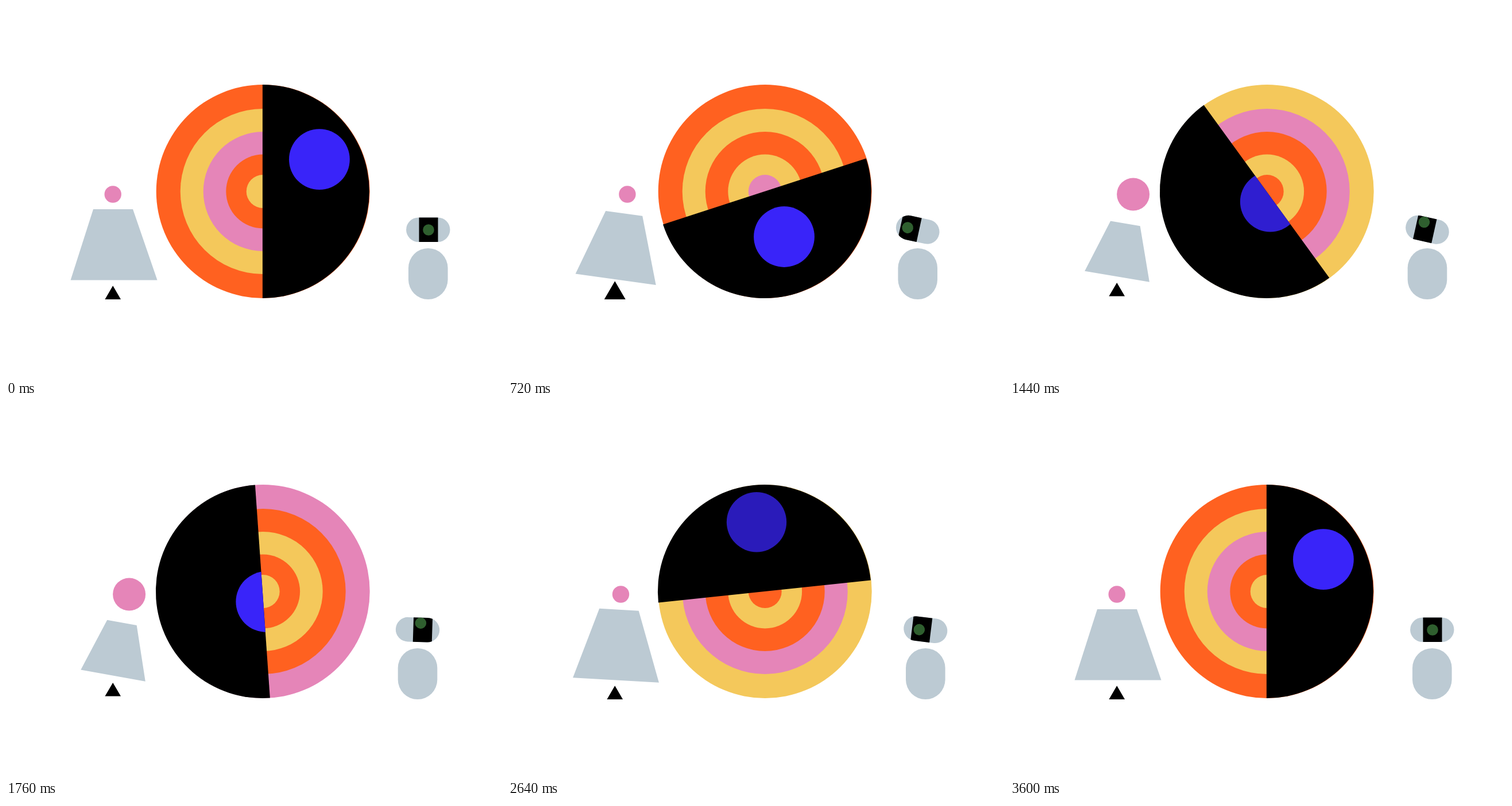
These frames come from a looping animation (864x648 px, 3640 ms). An HTML page with a canvas:

```html
<!DOCTYPE html>
<html>
<head>
<meta charset="utf-8">
<style>
  html, body { margin: 0; width: 100%; height: 100%; overflow: hidden; background: #fff; }
  canvas { display: block; }
</style>
</head>
<body>
<canvas id="stage" width="864" height="648"></canvas>
<script>
const ctx = document.getElementById('stage').getContext('2d');
const TAU = Math.PI * 2;
const LOOP = 3640, TURN = 3600, FRAME = 40;
const ORANGE = '#ff6120', YELLOW = '#f4c85b', PINK = '#e585b8';
const GREY = '#bccad3', BLUE = '#3924f9', GREEN = '#2f5f2f', BLACK = '#000';

const RING_RADII = [186, 144, 104, 64.4, 29];
const RING_COLORS = [ORANGE, YELLOW, PINK, ORANGE, YELLOW];
const MOONS = [[481, 402], [453.3, 341], [433, 202.2], [545.9, 267.2]];

const clamp = u => Math.max(0, Math.min(1, u));

// 0 to 1 with easing at both ends
function rise(t, start, end) {
  const u = clamp((t - start) / (end - start));
  return u * u * (3 - 2 * u);
}
// eases up, holds, eases down
const hold = (t, a, b, c, d) => rise(t, a, b) - rise(t, c, d);
// one soft swing up and back
const swing = (t, start, end) => Math.sin(clamp((t - start) / (end - start)) * Math.PI) ** 2;

function fillPath(color, build) {
  ctx.beginPath();
  build();
  ctx.fillStyle = color;
  ctx.fill();
}
const circle = (x, y, r, color) => fillPath(color, () => ctx.arc(x, y, r, 0, TAU));
const polygon = (color, ...points) => fillPath(color, () => points.forEach(p => ctx.lineTo(...p)));
const pill = (x, y, w, h, color) =>
  fillPath(color, () => ctx.roundRect(x - w / 2, y - h / 2, w, h, Math.min(w, h) / 2));

function group(x, y, degrees, scale, draw) {
  ctx.save();
  ctx.translate(x, y);
  ctx.rotate(degrees * TAU / 360);
  ctx.scale(scale, scale);
  draw();
  ctx.restore();
}

function drawDisc(t) {
  const step = Math.floor(t / 240);
  RING_RADII.forEach((r, i) => circle(447.7, 323, r, RING_COLORS[(i + step) % 5]));

  const angle = t / TURN * TAU;
  ctx.save();
  fillPath(BLACK, () => ctx.arc(446.9, 323, 186, angle - TAU / 4, angle + TAU / 4));
  ctx.clip();
  drawMoons(t);
  ctx.restore();
}

// A moon appears every 800 ms; each is gone shortly before the next, the last stays into the next turn.
function drawMoons(t) {
  const first = 440, gap = 800;
  MOONS.forEach(([x, y], i) => {
    const start = first + gap * i;
    const next = i < MOONS.length - 1 ? start + gap : first + TURN;
    const age = (t - start + TURN) % TURN;
    const alpha = clamp(Math.min(age / 240, (next - start - 80 - age) / 160));
    ctx.globalAlpha = alpha;
    circle(x, y, 50 + 2.9 * alpha, BLUE);
  });
}

function drawBell(t) {
  const shrink = hold(t, 560, 1040, 2240, 2680);
  const sway = swing(t, 1160, 2360);

  const headX = 186.2 + 28.4 * hold(t, 200, 960, 2260, 2900) - 5 * swing(t, 2700, 3600);
  const headR = 14.7 + 13.8 * hold(t, 800, 1060, 2240, 2640) + 4.3 * swing(t, 900, 1420);
  circle(headX, 328, headR, PINK);

  const tilt = 9 * hold(t, 140, 880, 2260, 2900) + 1.2 * sway - 1.7 * swing(t, 2800, 3200);
  group(188 - 1.5 * shrink, 477.5 - 5 * shrink - 2.8 * sway, tilt, 1 - .243 * shrink, () =>
    polygon(GREY, [-36, -123.5], [33, -123.5], [75.5, 0], [-75.5, 0]));

  const footY = 511 - 5.4 * hold(t, 720, 1160, 1760, 2640);
  group(186.2, footY, 0, 1 + .34 * swing(t, 400, 1040), () =>
    polygon(BLACK, [0, -23.7], [13.8, 0], [-13.8, 0]));
}

function drawRobot(t) {
  const x = 735.3 + 11 * swing(t, 40, 440) - 21.6 * rise(t, 280, 560)
    + 13.6 * (swing(t, 1068, 1896) + rise(t, 1896, 2310)) + 8 * rise(t, 2960, 3320);
  const tilt = 17.2 * hold(t, 280, 960, 1200, 1900) + 7 * hold(t, 2060, 2600, 2960, 3320);
  const visor = .7 - 14.7 * hold(t, 280, 560, 1200, 1680) + 8.2 * hold(t, 1300, 1700, 2280, 2600)
    - 12 * hold(t, 2400, 2800, 2900, 3200) + 9.5 * swing(t, 3120, 3600);
  const eyeX = visor - 3.9 * hold(t, 280, 560, 2600, 3400);
  const eyeY = .3 - 12 * hold(t, 680, 1400, 1760, 2000) + 20.2 * hold(t, 1800, 2200, 2240, 2700)
    - 2.8 * swing(t, 2800, 3200);

  pill(x, 466.5, 68.6, 89, GREY);
  group(x, 389.7, tilt, 1, () => {
    pill(0, 0, 76.4, 42.6, GREY);
    ctx.clip();
    ctx.fillStyle = BLACK;
    ctx.fillRect(visor - 16.5, -22, 33, 44);
    circle(eyeX, eyeY, 9.8, GREEN);
  });
}

function render(now) {
  const t = Math.floor(now % LOOP / FRAME) * FRAME;
  ctx.clearRect(0, 0, 864, 648);
  drawDisc(t);
  drawBell(t);
  drawRobot(t);
}

function loop() {
  render(performance.now());
  requestAnimationFrame(loop);
}
loop();
</script>
</body>
</html>
```
